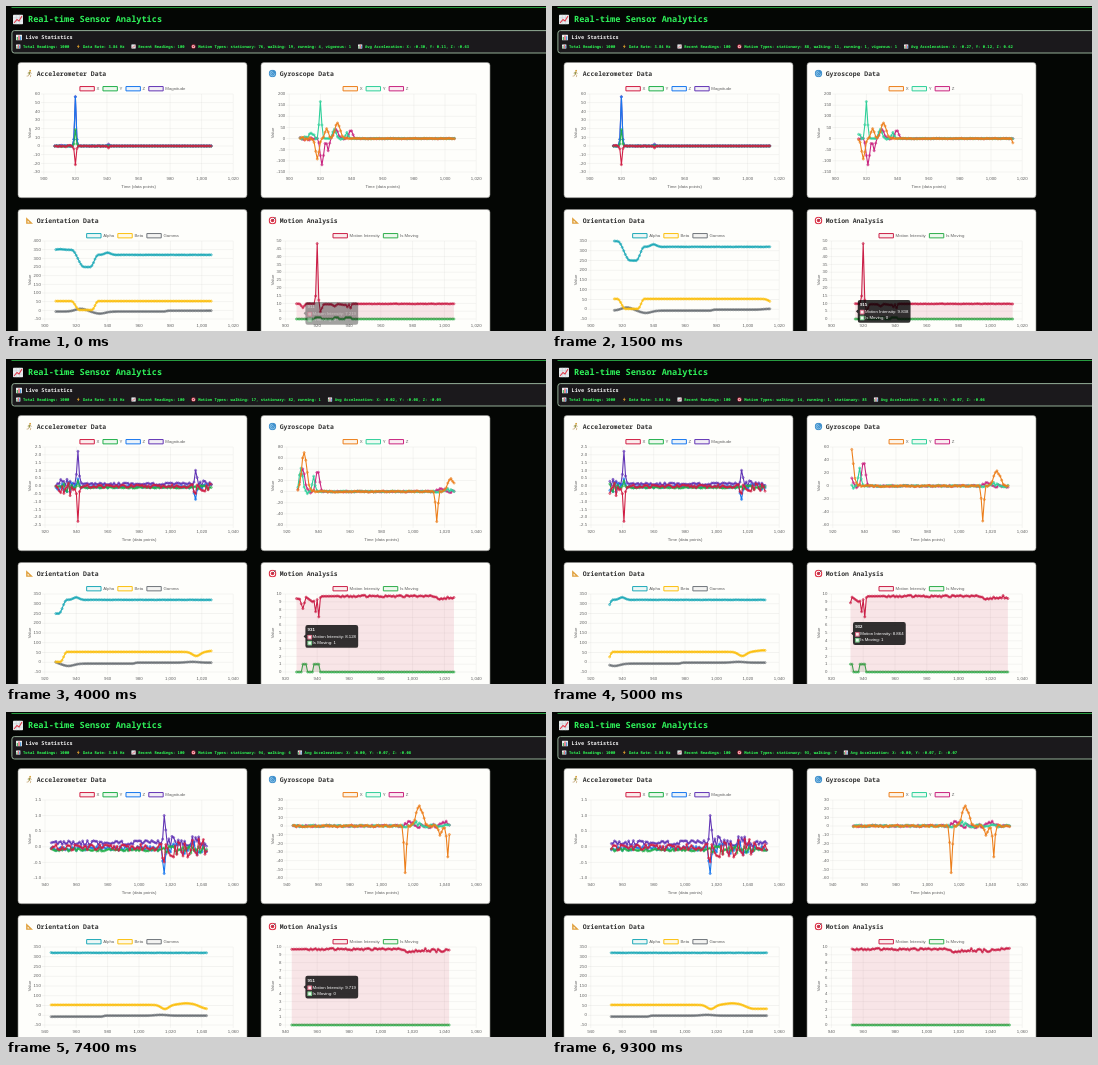
Animation of 540 by 325 pixels, one loop 9.4 s. Source, as an HTML page with a canvas:

```html
<!DOCTYPE html>
<html lang="en">
<head>
<meta charset="utf-8">
<title>Real-time Sensor Analytics</title>
<style>
  html, body { margin: 0; width: 100%; height: 100%; overflow: hidden; background: #040604; }
  svg, canvas { position: absolute; left: 0; top: 0; width: 540px; height: 325px; }
  text { font-family: "Noto Sans Mono", "DejaVu Sans Mono", monospace; text-rendering: geometricPrecision; white-space: pre; }
  .heading { font-size: 8.6px; font-weight: 600; fill: #2ff25a; }
  .label { font-size: 5.25px; font-weight: 600; fill: #f2f2f2; }
  .stat { font-size: 3.87px; font-weight: 700; fill: #2dfb55; }
  .card { fill: #fefefb; stroke: #8c8c88; stroke-width: .6; }
  .name { font-size: 6.45px; font-weight: 600; fill: #333; }
</style>
</head>
<body>
<svg viewBox="0 0 540 325">
  <defs>
    <symbol id="trend" viewBox="0 0 10 10">
      <rect width="10" height="10" rx="1" fill="#e9eef0"/>
      <path d="M0 3.3H10M0 6.6H10M3.3 0V10M6.6 0V10" stroke="#b5c6cc" stroke-width=".4"/>
      <path d="M1 8.5L4 5L6 6.5L9 1.5" fill="none" stroke="#e23b4b" stroke-width="1.1"/>
    </symbol>
    <symbol id="bars" viewBox="0 0 10 10">
      <rect width="10" height="10" rx="1" fill="#e9eef0"/>
      <path d="M2.2 9V4" stroke="#3fae57" stroke-width="1.8"/>
      <path d="M5 9V1.5" stroke="#e23b4b" stroke-width="1.8"/>
      <path d="M7.8 9V3" stroke="#3c8fd8" stroke-width="1.8"/>
    </symbol>
    <symbol id="bolt" viewBox="0 0 10 10"><path d="M6.5 0L2 5.6H5L3.4 10L8.2 4.2H5.2Z" fill="#ffb52e"/></symbol>
    <symbol id="target" viewBox="0 0 10 10">
      <circle cx="5" cy="5" r="4.8" fill="#dc3146"/><circle cx="5" cy="5" r="3.3" fill="#fff"/>
      <circle cx="5" cy="5" r="2.2" fill="#dc3146"/><path d="M5 5L9 1" stroke="#456" stroke-width=".9"/>
    </symbol>
    <symbol id="runner" viewBox="0 0 10 10">
      <circle cx="5.8" cy="1.5" r="1.2" fill="#d9a441"/>
      <path d="M5.2 3L4.6 6" stroke="#8a9b4a" stroke-width="2"/>
      <path d="M4.7 6L6.6 7.3L6 9.6M4.5 6L3.6 8L1.4 8.3M5.2 3.4L7.8 5M5 3.4L2.6 4.6" fill="none" stroke="#b8935a" stroke-width=".8"/>
    </symbol>
    <symbol id="cyclone" viewBox="0 0 10 10">
      <circle cx="5" cy="5" r="4.6" fill="#3f8fcb"/>
      <path d="M8 5A3 3 0 1 1 5 2M5 6.2A1.2 1.2 0 1 1 6.2 5" fill="none" stroke="#a9d8f2" stroke-width=".8"/>
    </symbol>
    <symbol id="square" viewBox="0 0 10 10"><path d="M.8 .8V9.2H9.4ZM2.6 5V7.5H5.2Z" fill="#e0a03c" fill-rule="evenodd"/></symbol>
  </defs>
  <path d="M5.5 1.5H540" stroke="#279a40"/>
  <use href="#trend" x="7" y="8.5" width="10" height="10"/>
  <text class="heading" x="22" y="16.2">Real-time Sensor Analytics</text>
  <rect x="5.9" y="24.6" width="545" height="22.4" rx="2.5" fill="#1b191c" stroke="#93ad96"/>
  <use href="#bars" x="10" y="28.5" width="6" height="6"/>
  <text class="label" x="19.5" y="33.3">Live Statistics</text>
  <g id="stats"></g>
  <g id="cards"></g>
</svg>
<canvas></canvas>
<script>
const LOOP = 9400, U = 0.36, FONT = 12 * U;
const PLOT_TOP = 88, PLOT_H = 78, RIGHT = 227.2, WINDOW = 100;
const CARD_X = [12, 255], CARD_Y = [56, 203];
const POINTER = { x: 297, leave: 8300 };

const canvas = document.querySelector('canvas');
const ctx = canvas.getContext('2d');
const dpr = window.devicePixelRatio || 1;
canvas.width = 540 * dpr;
canvas.height = 325 * dpr;

// ---- sensor signals, as functions of the reading index ----
function noise(i, seed) {
  const v = Math.sin(i * 12.9898 + seed * 78.233) * 43758.5453;
  return (v - Math.floor(v)) * 2 - 1;
}
const bell = (i, mid, width) => Math.exp(-(((i - mid) / width) ** 2));
const bells = (i, list) => list.reduce((sum, [mid, width, height]) => sum + height * bell(i, mid, width), 0);
function ease(i, from, to) {
  const f = Math.min(1, Math.max(0, (i - from) / (to - from)));
  return f * f * (3 - 2 * f);
}
function path(i, points) {
  const n = points.findIndex(p => i <= p[0]);
  if (n < 1) return points.at(n)[1];
  const [a, b] = [points[n - 1], points[n]];
  return a[1] + (b[1] - a[1]) * (i - a[0]) / (b[0] - a[0]);
}

// the events every sensor feels: a sharp knock, a short walk, a late handling
const knock = i => bell(i, 920, 0.7);
const walk = i => bell(i, 934, 5);
const handling = i => ease(i, 1012, 1016) * (1 - ease(i, 1042, 1047));

function accelAxis(seed, base, rough, knocked, step, jolt) {
  return i => {
    const shake = 0.1 + bell(i, 912, 8) + 0.6 * walk(i) + 0.22 * handling(i);
    return base + rough * shake * noise(i, seed) + knocked * knock(i) + step * bell(i, 941, 0.8) + jolt * bell(i, 1016, 1);
  };
}

function gyroAxis(seed, swings) {
  return i => noise(i, seed) * (1 + 10 * bell(i, 912, 5) + 3 * walk(i) + handling(i)) + bells(i, swings);
}

const accel = [
  accelAxis(1, -0.02, 1, -21.5, -2.15, -0.2),
  accelAxis(2, -0.1, 0.4, 19, 0.4, 0.1),
  accelAxis(3, -0.05, 0.7, 57, 0.6, -0.83),
  accelAxis(4, 0.13, 0.7, 57, 2.2, 0.72)
];
const magnitude = i => Math.abs(accel[3](i));

const gyro = [
  gyroAxis(5, [[918, 1.5, -95], [924, 1.5, 45], [931, 2.2, 72], [1015, 1, -53], [1024, 3, 22], [1037, 1.5, -9], [1042, 0.9, -36]]),
  gyroAxis(6, [[914, 2, 30], [920, 1, 165], [929, 1.5, 44], [937, 1, 28], [1021, 3, 4]]),
  gyroAxis(7, [[921, 1.5, -118], [925, 1, -55], [930, 2, 42], [939.5, 1.6, 38], [1018, 3, 4], [1040, 3, 4]])
];

const orient = [
  i => 349 - 99 * ease(i, 917, 925) + 70 * ease(i, 929, 934) + 3.5 * bell(i, 910, 3) + 13 * bell(i, 940, 2.5) + noise(i, 8) / 2,
  i => 53 - 51 * (ease(i, 917, 922) - ease(i, 930, 934)) - 21 * bell(i, 1016.5, 3.5) + 8 * bell(i, 1030, 6) - 20 * ease(i, 1034, 1044),
  i => -7 + 16 * bell(i, 923, 5) - 12 * bell(i, 935, 5) + 5 * ease(i, 976, 979) + 4 * bell(i, 1014, 5)
];

const effort = [[907, 9.8], [915, 9.838], [929, 9.344], [931, 8.128], [933, 9.6], [937, 9.008], [943, 9.7], [951, 9.719]];
const activeSpans = [[919, 922], [931, 933], [938, 941]];
const motion = [
  i => path(i, effort) + 39 * knock(i) + bells(i, [[911, 1.2, -2.6], [922, 1.2, -5], [939, 0.5, -1.5], [941, 0.5, -2.4], [1017, 0.8, -0.4]]) +
    0.12 * noise(i, 10) * ease(i, 951, 953) - 0.4 * Math.abs(noise(i, 11)) * handling(i),
  i => +activeSpans.some(([from, to]) => i >= from && i <= to)
];

const series = (names, colors, fns) => names.map((name, n) => ({ name, color: colors[n], value: fns[n] }));
const charts = [
  { title: 'Accelerometer Data', icon: 'runner',
    sets: series(['X', 'Y', 'Z', 'Magnitude'], ['#d11f45', '#22b04b', '#1877ee', '#6235b5'], [...accel.slice(0, 3), magnitude]) },
  { title: 'Gyroscope Data', icon: 'cyclone',
    sets: series(['X', 'Y', 'Z'], ['#ec7f1c', '#2fd09a', '#c9247f'], gyro) },
  { title: 'Orientation Data', icon: 'square',
    sets: series(['Alpha', 'Beta', 'Gamma'], ['#1fa9b8', '#fbc010', '#70757a'], orient) },
  { title: 'Motion Analysis', icon: 'target', fill: true,
    sets: series(['Motion Intensity', 'Is Moving'], ['#cb2148', '#2fae4b'], motion) }
];

// ---- page furniture ----
const icon = (id, x, y, s) => `<use href="#${id}" x="${x}" y="${y}" width="${s}" height="${s}"/>`;

document.getElementById('cards').innerHTML = charts.map((c, n) => {
  const x = CARD_X[n % 2], y = CARD_Y[n >> 1];
  return `<rect class="card" x="${x}" y="${y + 0.5}" width="229" height="135.2" rx="3"/>` +
    icon(c.icon, x + 7.5, y + 7.5, 8) + `<text class="name" x="${x + 18.7}" y="${y + 14}">${c.title}</text>`;
}).join('');

const statStages = [
  [0, 'stationary: 76, walking: 19, running: 4, vigorous: 1', 'X: -0.30, Y: 0.11, Z: -0.63'],
  [1000, 'stationary: 88, walking: 11, running: 1, vigorous: 1', 'X: -0.27, Y: 0.12, Z: 0.62'],
  [3000, 'walking: 17, stationary: 82, running: 1', 'X: -0.02, Y: -0.08, Z: -0.05'],
  [5000, 'walking: 14, running: 1, stationary: 85', 'X: 0.02, Y: -0.07, Z: -0.06'],
  [7000, 'stationary: 94, walking: 6', 'X: -0.00, Y: -0.07, Z: -0.08'],
  [9000, 'stationary: 93, walking: 7', 'X: -0.00, Y: -0.07, Z: -0.07']
];
let shownStage = null;

function showStats(t) {
  const stage = statStages.filter(s => s[0] <= t).pop();
  if (stage === shownStage) return;
  shownStage = stage;
  let x = 10;
  document.getElementById('stats').innerHTML = [
    ['bars', 'Total Readings: 1000'], ['bolt', 'Data Rate: 3.84 Hz'], ['trend', 'Recent Readings: 100'],
    ['target', 'Motion Types: ' + stage[1]], ['bars', 'Avg Acceleration: ' + stage[2]]
  ].map(([id, text]) => {
    const out = icon(id, x, 38.2, 4.6) + `<text class="stat" x="${x + 7}" y="42">${text}</text>`;
    x += 13.5 + text.length * 2.322;
    return out;
  }).join('');
}

// ---- chart drawing ----
function niceStep(v) {
  const base = 10 ** Math.floor(Math.log10(v)), f = v / base;
  return (f <= 1 ? 1 : f <= 2 ? 2 : f <= 5 ? 5 : 10) * base;
}

function makeScale(min, max) {
  let step = niceStep((max - min) / 10);
  const spaces = Math.ceil(max / step) - Math.floor(min / step);
  if (spaces > 10) step = niceStep(spaces * step / 10);
  const lo = Math.floor(min / step), hi = Math.ceil(max / step), ticks = [];
  for (let n = lo; n <= hi; n++) ticks.push(n * step);
  return { min: lo * step, max: hi * step, step, ticks };
}

function setFont(bold) {
  ctx.font = `${bold ? 'bold ' : ''}${FONT}px "Liberation Sans", Arial, sans-serif`;
}

function write(text, x, y, align = 'center', color = '#5f5f5f') {
  ctx.textAlign = align;
  ctx.fillStyle = color;
  ctx.fillText(text, x, y);
}

function drawLegend(sets, cx, y) {
  const widths = sets.map(s => 46 * U + ctx.measureText(s.name).width);
  let x = cx - (widths.reduce((a, b) => a + b) + (sets.length - 1) * 10 * U) / 2;
  sets.forEach((s, n) => {
    ctx.fillStyle = s.color + '14';
    ctx.fillRect(x, y - 2.15, 40 * U, FONT);
    ctx.strokeStyle = s.color;
    ctx.lineWidth = 1;
    ctx.strokeRect(x, y - 2.15, 40 * U, FONT);
    write(s.name, x + 46 * U, y, 'left');
    x += widths[n] + 10 * U;
  });
}

function segment(x1, y1, x2, y2) {
  ctx.beginPath();
  ctx.moveTo(x1, y1);
  ctx.lineTo(x2, y2);
  ctx.stroke();
}

function drawSeries(color, pts, baseY) {
  ctx.beginPath();
  pts.forEach(([x, y]) => ctx.lineTo(x, y));
  ctx.strokeStyle = color;
  ctx.lineWidth = 1.1;
  ctx.stroke();
  if (baseY !== undefined) {
    ctx.lineTo(pts[pts.length - 1][0], baseY);
    ctx.lineTo(pts[0][0], baseY);
    ctx.fillStyle = color + '1c';
    ctx.fill();
  }
  ctx.fillStyle = color + '50';
  ctx.lineWidth = 0.6;
  for (const [x, y] of pts) {
    ctx.beginPath();
    ctx.arc(x, y, 1.05, 0, Math.PI * 2);
    ctx.fill();
    ctx.stroke();
  }
}

function drawChart(chart, n, start) {
  const dx = CARD_X[n % 2] - CARD_X[0], dy = CARD_Y[n >> 1] - CARD_Y[0];
  const index = Array.from({ length: WINDOW }, (_, k) => start + k);
  const values = chart.sets.map(s => index.map(s.value));
  const all = values.flat();
  const xs = makeScale(start, start + WINDOW - 1);
  const ys = makeScale(Math.min(...all), Math.max(...all));
  const top = PLOT_TOP + dy, bottom = top + PLOT_H, right = RIGHT + dx;

  setFont();
  const labels = ys.ticks.map(v => ys.step < 1 ? (Math.abs(v) < 1e-9 ? 0 : v).toFixed(1) : String(Math.round(v)));
  const left = dx + 31.6 + Math.max(...labels.map(s => ctx.measureText(s).width));
  const px = v => left + (v - xs.min) / (xs.max - xs.min) * (right - left);
  const py = v => bottom - (v - ys.min) / (ys.max - ys.min) * PLOT_H;

  drawLegend(chart.sets, dx + 126.7, top - 5.3);

  ctx.strokeStyle = 'rgba(0,0,0,.11)';
  ctx.lineWidth = 0.4;
  ys.ticks.forEach((v, k) => {
    segment(left - 2.9, py(v), right, py(v));
    write(labels[k], left - 4, py(v), 'right');
  });
  xs.ticks.forEach(v => {
    segment(px(v), top, px(v), bottom + 2.9);
    write(v.toLocaleString('en-US'), px(v), bottom + 6.5);
  });
  write('Time (data points)', (left + right) / 2, bottom + 14.5);
  ctx.save();
  ctx.translate(dx + 23.4, (top + bottom) / 2);
  ctx.rotate(-Math.PI / 2);
  write('Value', 0, 0);
  ctx.restore();

  for (let k = chart.sets.length - 1; k >= 0; k--)
    drawSeries(chart.sets[k].color, index.map((i, m) => [px(i), py(values[k][m])]), chart.fill && py(0));
  return { px, py, xs, left, right };
}

function drawTooltip(sets, start, { px, py, xs, left, right }, alpha) {
  const hover = Math.round(xs.min + (POINTER.x - left) / (right - left) * (xs.max - xs.min));
  const i = Math.min(Math.max(hover, start), start + WINDOW - 1);
  const vals = sets.map(s => s.value(i));
  const lines = sets.map((s, k) => `${s.name}: ${+vals[k].toFixed(3)}`);
  const mid = (py(vals[0]) + py(vals[1])) / 2, h = 22.9;
  const w = 9.4 + Math.max(...lines.map(s => ctx.measureText(s).width));
  const x = px(i) + 2.5, y = mid - h / 2;

  ctx.save();
  ctx.globalAlpha = alpha;
  ctx.fillStyle = 'rgba(0,0,0,.8)';
  ctx.beginPath();
  ctx.roundRect(x, y, w, h, 2.2);
  ctx.moveTo(x, mid - 1.8);
  ctx.lineTo(x - 1.8, mid);
  ctx.lineTo(x, mid + 1.8);
  ctx.fill();
  setFont(true);
  write(i, x + 2.2, y + 4.8, 'left', '#fff');
  setFont();
  lines.forEach((text, k) => {
    const ly = y + 12.2 + k * 5.9;
    ctx.fillStyle = '#fff';
    ctx.fillRect(x + 2.2, ly - 2.15, FONT, FONT);
    ctx.fillStyle = sets[k].color + '1a';
    ctx.fillRect(x + 2.2, ly - 2.15, FONT, FONT);
    ctx.strokeStyle = sets[k].color;
    ctx.lineWidth = 0.6;
    ctx.strokeRect(x + 2.5, ly - 1.85, FONT - 0.6, FONT - 0.6);
    write(text, x + 7.2, ly, 'left', '#fff');
  });
  ctx.restore();
}

function render(time) {
  const t = Math.floor(time % LOOP / 100) * 100;
  const start = Math.floor(907.6 + t * 0.00497);
  ctx.setTransform(dpr, 0, 0, dpr, 0, 0);
  ctx.clearRect(0, 0, 540, 325);
  ctx.textBaseline = 'middle';
  ctx.lineJoin = 'round';
  showStats(t);
  const plots = charts.map((c, n) => drawChart(c, n, start));
  const alpha = Math.min(1, 0.45 + t / 180, (POINTER.leave - t) / 200);
  if (alpha > 0) drawTooltip(charts[3].sets, start, plots[3], alpha);
}

const began = performance.now();
function tick() {
  render(performance.now() - began);
  requestAnimationFrame(tick);
}
tick();
</script>
</body>
</html>
```
